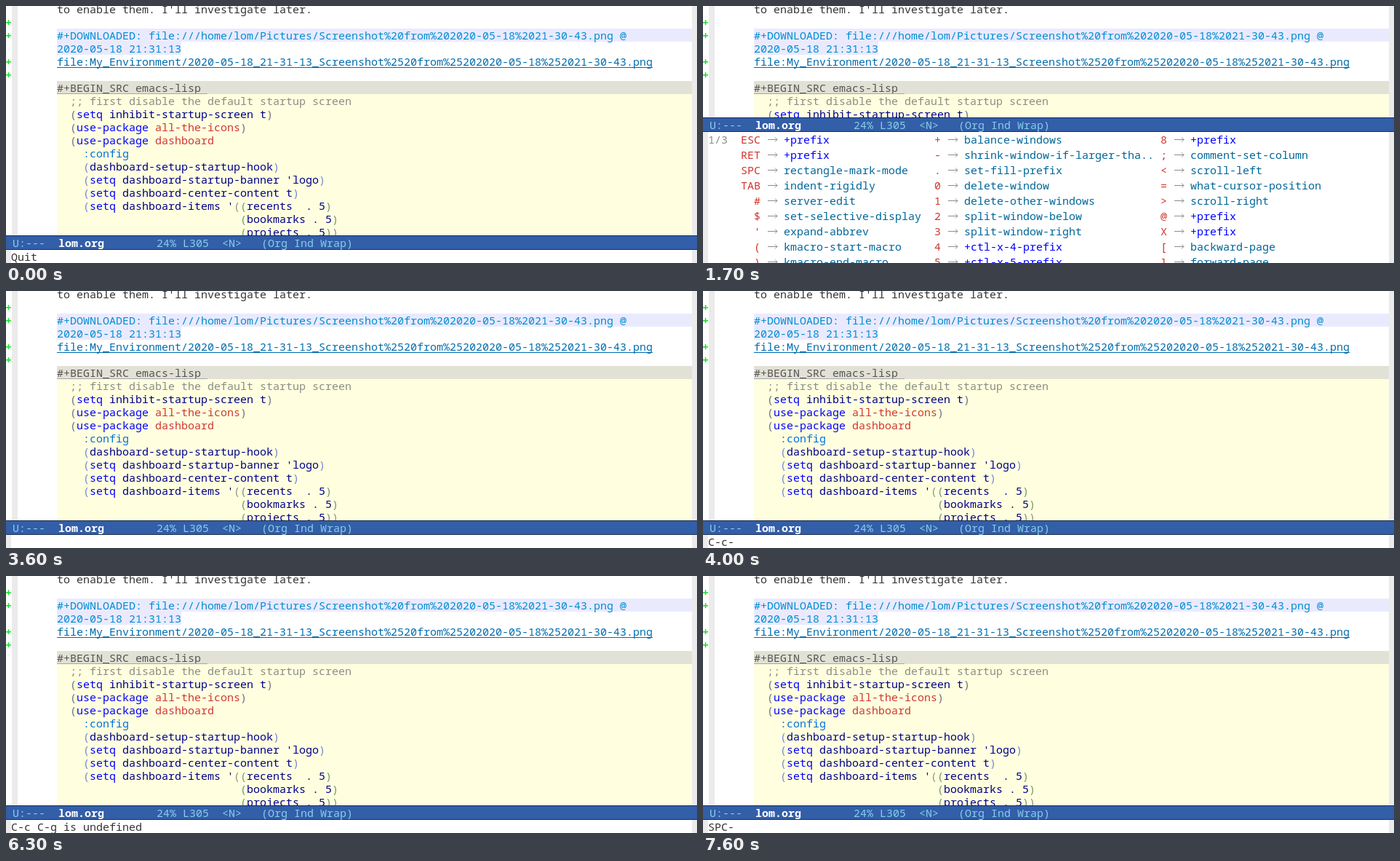
These frames come from a looping animation (950 by 353 pixels, 8000 ms). An HTML page with a canvas:

```html
<!DOCTYPE html>
<html lang="en">
<head>
<meta charset="utf-8">
<title>Editor key prefixes</title>
<style>
html, body { margin: 0; width: 100%; height: 100%; overflow: hidden; background: #fff; }
canvas { display: block; }
</style>
</head>
<body>
<canvas id="stage" width="950" height="353"></canvas>
<script>
const ctx = document.getElementById('stage').getContext('2d');
const W = 950, H = 353, CHAR = 9, ROW = 18, LOOP = 8000;
const LEFT = 70, RIGHT = 943;
const FONT = '15px "Noto Sans Mono", monospace';

const COLOR = {
  text: '#333333', fringe: '#ebebeb', added: '#1fdc2f',
  meta: '#008ed1', metaBg: '#eaeaff', link: '#006daf',
  begin: '#555555', beginBg: '#e2e1d5', beginLine: '#a7a6aa',
  block: '#000088', blockBg: '#ffffe0', comment: '#8d8d84',
  keyword: '#0000ff', constant: '#d0372d', builtin: '#006fe0', command: '#006699',
  bar: '#335ea8', barEdge: '#1a2f54', barText: '#85ceeb', barFlash: '#f2804f'
};
const PARENS = ['#707183', '#7388d6', '#909183', '#709870'];
const TOKENS = {
  'setq': COLOR.keyword, 'use-package': COLOR.keyword,
  'all-the-icons': COLOR.constant, 'dashboard': COLOR.constant, ':config': COLOR.builtin
};

const CODE = [
  '  ;; first disable the default startup screen',
  '  (setq inhibit-startup-screen t)',
  '  (use-package all-the-icons)',
  '  (use-package dashboard',
  '    :config',
  '    (dashboard-setup-startup-hook)',
  "    (setq dashboard-startup-banner 'logo)",
  '    (setq dashboard-center-content t)',
  "    (setq dashboard-items '((recents  . 5)",
  ' '.repeat(28) + '(bookmarks . 5)',
  ' '.repeat(28) + '(projects . 5))'
];

// Each column: x of the right edge of its keys, then "key command" rows.
const CTRL_X = { page: '1/3', columns: [
  [79, 'ESC +prefix', 'RET +prefix', 'SPC rectangle-mark-mode', 'TAB indent-rigidly', '# server-edit',
    '$ set-selective-display', "' expand-abbrev", '( kmacro-start-macro', ') kmacro-end-macro'],
  [327, '+ balance-windows', '- shrink-window-if-larger-tha..', '. set-fill-prefix', '0 delete-window',
    '1 delete-other-windows', '2 split-window-below', '3 split-window-right', '4 +ctl-x-4-prefix', '5 +ctl-x-5-prefix'],
  [638, '8 +prefix', '; comment-set-column', '< scroll-left', '= what-cursor-position', '> scroll-right',
    '@ +prefix', 'X +prefix', '[ backward-page', '] forward-page']
] };
const CTRL_C = { page: '1/4', columns: [
  [79, 'RET hui-select-thing', 'SPC org-table-blank-field', 'TAB outline-show-children', '! +prefix', '" +prefix',
    '# org-update-statistics-cooki..', '$ org-archive-subtree', '% org-mark-ring-push', '& org-mark-ring-goto'],
  [390, '* org-ctrl-c-star', '+ org-table-sum', ', org-priority', '- org-ctrl-c-minus', '. org-time-stamp',
    '/ hui-search-web', ': org-toggle-fixed-width', '; org-toggle-comment', '< org-date-from-calendar']
] };

const TIMELINE = [
  { at: 0, echo: 'Quit' },
  { at: 600, echo: '' },
  { at: 900, echo: 'C-x-' },
  { at: 1700, popup: CTRL_X },
  { at: 2800, echo: 'C-x C-g is undefined', flash: true },
  { at: 2900, echo: 'C-x C-g is undefined' },
  { at: 3600, echo: '' },
  { at: 4000, echo: 'C-c-' },
  { at: 4700, popup: CTRL_C },
  { at: 6300, echo: 'C-c C-g is undefined' },
  { at: 7200, echo: '' },
  { at: 7600, echo: 'SPC-' }
];

function rect(x, y, w, h, color) {
  ctx.fillStyle = color;
  ctx.fillRect(x, y, w, h);
}

function write(text, x, baseline, color, bold) {
  ctx.font = (bold ? 'bold ' : '') + FONT;
  ctx.fillStyle = color;
  ctx.fillText(text, x, baseline);
}

function drawCode() {
  let depth = 0;
  CODE.forEach((line, i) => {
    const y = 136 + i * ROW;
    if (line.includes(';;')) return write(line, LEFT, y, COLOR.comment);
    for (const { 0: token, index } of line.matchAll(/[()]|[^()\s]+/g)) {
      let color = TOKENS[token] || COLOR.block;
      if (token === '(') color = PARENS[depth++];
      if (token === ')') color = PARENS[--depth];
      write(token, LEFT + index * CHAR, y, color);
    }
  });
}

function drawBuffer(bottom) {
  ctx.save();
  ctx.beginPath();
  ctx.rect(0, 0, W, bottom);
  ctx.clip();
  rect(8, 0, 8, bottom, COLOR.fringe);
  rect(RIGHT, 0, W - RIGHT, bottom, COLOR.fringe);
  for (const y of [28, 46, 82, 100]) write('+', -1, y, COLOR.added, true);

  write("to enable them. I'll investigate later.", LEFT, 10, COLOR.text);
  rect(LEFT, 31, RIGHT - LEFT, ROW, COLOR.metaBg);
  rect(LEFT, 49, 19 * CHAR, ROW, COLOR.metaBg);
  write('#+DOWNLOADED: file:///home/lom/Pictures/Screenshot%20from%202020-05-18%2021-30-43.png @', LEFT, 46, COLOR.meta);
  write('2020-05-18 21:31:13', LEFT, 64, COLOR.meta);
  write('file:My_Environment/2020-05-18_21-31-13_Screenshot%2520from%25202020-05-18%252021-30-43.png', LEFT, 82, COLOR.link);
  rect(LEFT, 84, 91 * CHAR, 1, COLOR.link);

  rect(LEFT, 103, RIGHT - LEFT, ROW, COLOR.beginBg);
  write('#+BEGIN_SRC emacs-lisp', LEFT, 118, COLOR.begin);
  rect(LEFT, 120, 23 * CHAR, 1, COLOR.beginLine);
  rect(LEFT, 121, RIGHT - LEFT, bottom - 121, COLOR.blockBg);
  drawCode();
  ctx.restore();
}

function drawModeLine(top, color) {
  rect(0, top, W, 20, COLOR.barEdge);
  rect(0, top + 1, W, 18, COLOR.bar);
  const y = top + 16;
  write('U:---', 9, y, color);
  write('lom.org', 72, y, '#ffffff', true);
  write('24% L305  <N>   (Org Ind Wrap)', 207, y, color);
}

function drawArrow(x, y) {
  ctx.strokeStyle = COLOR.comment;
  ctx.lineWidth = 1;
  ctx.beginPath();
  ctx.moveTo(x, y);
  ctx.lineTo(x + 13, y);
  ctx.moveTo(x + 10, y - 3);
  ctx.lineTo(x + 13, y);
  ctx.lineTo(x + 10, y + 3);
  ctx.stroke();
}

function drawPopup({ page, columns }) {
  write(page, 7, 189, COLOR.comment);
  for (const [edge, ...rows] of columns) {
    rows.forEach((row, i) => {
      const [key, command] = row.split(' ');
      const y = 189 + i * 21;
      write(key, edge - key.length * CHAR, y, COLOR.constant);
      drawArrow(edge + 10, y - 5.5);
      write(command, edge + 32, y, command[0] === '+' ? COLOR.keyword : COLOR.command);
    });
  }
}

function draw(now) {
  const time = now % LOOP;
  const { echo, popup, flash } = TIMELINE.findLast(step => step.at <= time);
  const barTop = popup ? 153 : 315;
  rect(0, 0, W, H, '#ffffff');
  drawBuffer(barTop);
  rect(0, barTop, 7, H - barTop, COLOR.fringe);
  rect(RIGHT, barTop, W - RIGHT, H - barTop, COLOR.fringe);
  drawModeLine(barTop, flash ? COLOR.barFlash : COLOR.barText);
  if (popup) drawPopup(popup);
  else write(echo, 7, 350, COLOR.text);
}

const start = performance.now();
function tick() {
  draw(performance.now() - start);
  requestAnimationFrame(tick);
}
tick();
</script>
</body>
</html>
```
